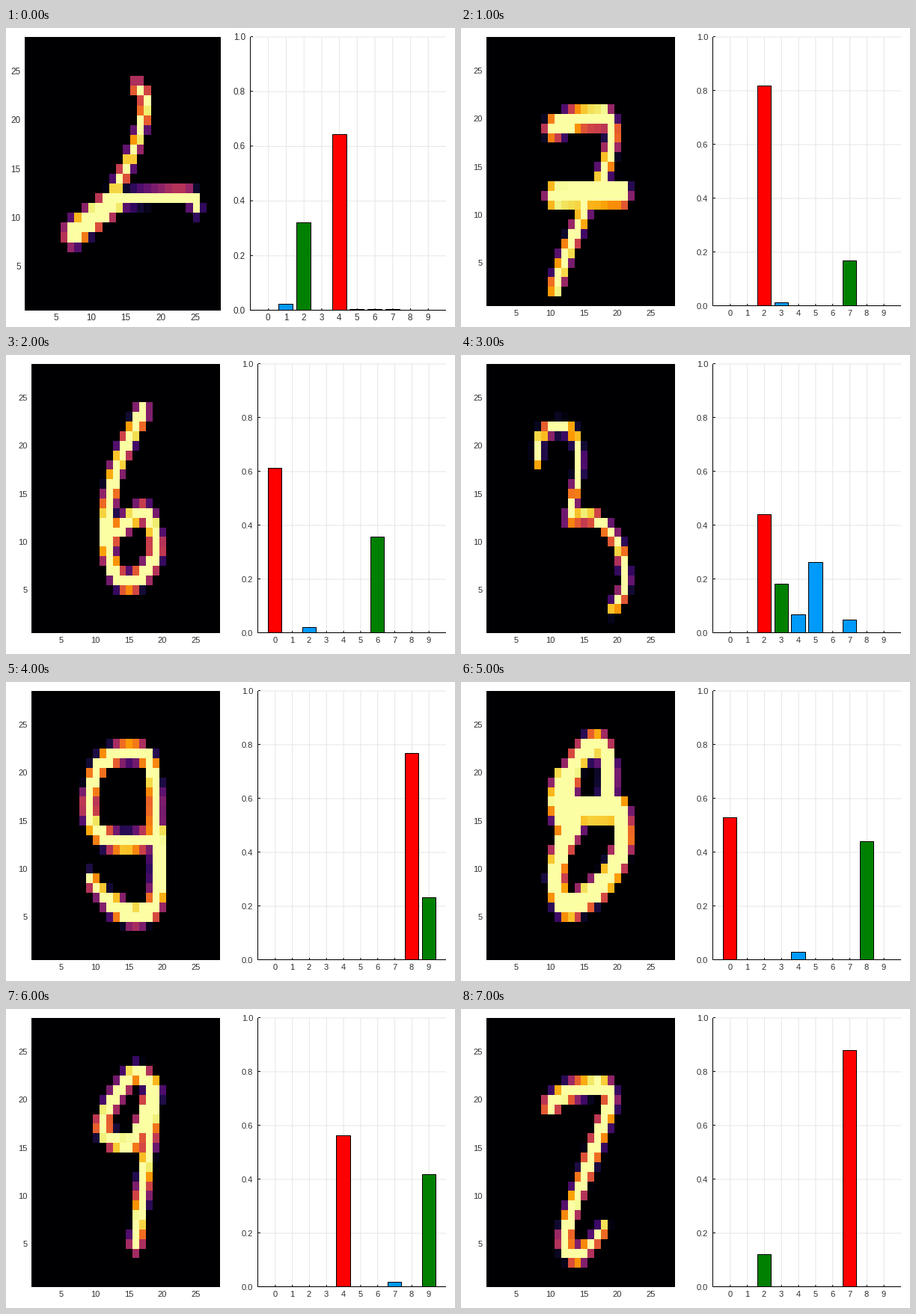
Write a matplotlib script that moves like this. It is 600 px wide and 400 px high and loops after 8000 ms.

```python
import numpy as np
import matplotlib.pyplot as plt
from matplotlib.animation import FuncAnimation
from matplotlib.patches import Rectangle

N = 28
BLUE, GREEN, RED = "#009afa", "#008000", "#ff0000"
TOP, RIGHT = 12, 588

# Each stroke: half width of the pen, then the points its curve runs through.
SLANTED_TWO = [
    (.75, (16.5, 23.4), (17.7, 22), (17, 19), (15.5, 16), (13.5, 13), (12.5, 11.5)),
    (1.35, (13.6, 11.9), (7.3, 8.4)),
    (.72, (13, 11.8), (18, 12.1), (24, 12.2), (25, 11)),
]
CROSSED_SEVEN = [
    (1.2, (10.2, 19), (14, 20), (18, 20.2)),
    (.9, (18.3, 20.3), (19.2, 19), (19, 17), (17.7, 14), (16, 12)),
    (1.4, (10.5, 12), (20.5, 12.2)),
    (.95, (15.5, 11.5), (14.2, 9), (12.3, 6), (10.6, 2.4)),
]
TALL_SIX = [
    (1.0, (17, 23.5), (13, 17.5), (11.5, 11), (13, 6.6), (16, 6), (19, 9),
     (17.2, 13), (12, 10.5)),
]
OPEN_THREE = [
    (.65, (8, 18.4), (8.4, 21), (11.5, 22), (13.7, 20.8), (14.1, 17.5),
     (13.2, 14), (12.7, 12.4)),
    (.7, (12.7, 12.5), (16.5, 12.5), (19.8, 10), (21, 7), (20.9, 5), (19.4, 3)),
]
HOOKED_NINE = [
    (1.0, (18.8, 14), (18.8, 18), (17.8, 21.4), (14.5, 22.2), (10.5, 20.7),
     (9, 17), (10, 14), (14, 12.7), (19, 13.3)),
    (1.15, (19.2, 14), (19.4, 9), (18.5, 6), (15.5, 5.2), (12.2, 6.4)),
    (.8, (12, 6.5), (9.2, 8.9)),
]
NARROW_EIGHT = [
    (1.25, (18.5, 16.5), (18.5, 21), (17, 23), (14.5, 21.8), (12.5, 19.5)),
    (1.9, (12.2, 19), (11.5, 17), (12.6, 14.6)),
    (1.4, (11.5, 16.4), (15, 16.1), (20, 16.1)),
    (1.35, (20.5, 16), (20.7, 12.5), (18.5, 9), (15, 6.9), (12.3, 6.1),
     (10.7, 8.5), (11.5, 12), (13.7, 14.8)),
]
LOOPED_NINE = [
    (.95, (18.5, 21.5), (15.5, 22.6), (10.8, 17.3), (15.5, 15.6), (18.8, 21.3),
     (17, 10.5), (16, 5)),
]
CURLED_TWO = [
    (1.0, (9.8, 19.4), (12.5, 20.8), (17.5, 21.4), (18.9, 20), (17.6, 17),
     (15.5, 13), (13.1, 8.5), (12, 5.2), (13.5, 3.8), (15, 4.2)),
    (.65, (15, 4.3), (16.5, 5.3), (18, 6.7)),
]

# Strokes, true digit, predicted digit, probabilities
SAMPLES = [
    (SLANTED_TWO, 2, 4, {1: .022, 2: .32, 4: .643, 5: .005, 6: .004, 7: .004}),
    (CROSSED_SEVEN, 7, 2, {2: .817, 3: .012, 7: .169}),
    (TALL_SIX, 6, 0, {0: .612, 2: .021, 6: .356}),
    (OPEN_THREE, 3, 2, {2: .439, 3: .181, 4: .068, 5: .262, 7: .048}),
    (HOOKED_NINE, 9, 8, {8: .768, 9: .231}),
    (NARROW_EIGHT, 8, 0, {0: .529, 4: .03, 8: .44}),
    (LOOPED_NINE, 9, 4, {4: .562, 7: .018, 9: .418}),
    (CURLED_TWO, 2, 7, {2: .121, 7: .879}),
]


def smooth(points, steps=24):
    """Catmull-Rom curve through the points."""
    p = np.array(points, float)
    p = np.vstack([2 * p[0] - p[1], p, 2 * p[-1] - p[-2]])
    t = np.linspace(0, 1, steps)[:, None]
    return np.vstack([
        b + .5 * t * (c - a + t * (2 * a - 5 * b + 4 * c - d
                                   + t * (3 * (b - c) + d - a)))
        for a, b, c, d in zip(p, p[1:], p[2:], p[3:])])


def rasterize(strokes):
    """Ink in each grid cell, from its distance to the pen path."""
    gx, gy = np.meshgrid(np.arange(1, N + 1), np.arange(1, N + 1))
    ink = np.zeros((N, N))
    for width, *points in strokes:
        curve = smooth(points)
        dist = np.hypot(gx[..., None] - curve[:, 0],
                        gy[..., None] - curve[:, 1]).min(axis=2)
        ink = np.maximum(ink, 1.2 * (width - dist) + .5)
    return np.clip(ink, 0, 1)


IMAGES = [rasterize(sample[0]) for sample in SAMPLES]

fig = plt.figure(figsize=(6, 4), dpi=100, facecolor="white")
ax = fig.add_axes([0, 0, 1, 1])


def line(xs, ys, color="black", z=4):
    ax.plot(xs, ys, color=color, lw=.72, zorder=z, snap=False,
            solid_capstyle="butt")


def axes_lines(left, right, base):
    line([left - .5] * 2, [TOP, base])
    line([left - 1, right], [base - .5] * 2)


def label(x, y, text, size, ha="center"):
    ax.text(x, y + .36 * size, text, ha=ha, va="baseline", color="#303030",
            fontsize=size * .72, family="Liberation Sans")


def edge(v):
    """Centre of the pixel that holds v, for crisp outlines."""
    return np.floor(v) + .5


def draw_digit(image, left, right, base, size):
    ax.imshow(image, cmap="inferno", vmin=0, vmax=1, origin="lower",
              extent=(left, right, base, TOP), interpolation="nearest",
              aspect="auto", zorder=1)
    axes_lines(left, right, base)
    for v in range(5, 26, 5):
        f = (v - .5) / N
        label(left + f * (right - left) - 1.2, base + 9, str(v), size)
        label(left - 6.5, base - f * (base - TOP), str(v), size, "right")


def draw_bars(truth, guess, probs, left, base, size):
    height, step = base - TOP, (RIGHT - left) / 11
    for i in range(6):
        y = base - height * i / 5
        line([left, RIGHT], [y, y], "#e6e6e6", 1)
        line([left, left + 3], [y - .5, y - .5])
        label(left - 7, y - .3, f"{i / 5:.1f}", size, "right")
    for d in range(10):
        x = left + step * (d + 1)
        line([x, x], [TOP, base], "#e6e6e6", 1)
        line([x, x], [base - 3, base], z=2)
        label(x - .5, base + 9, str(d), size)
        color = GREEN if d == truth else RED if d == guess else BLUE
        x0, x1 = edge(x - .4 * step), edge(x + .4 * step)
        y0, y1 = edge(base - height * probs.get(d, 0)), base - .5
        ax.add_patch(Rectangle((x0, y1), x1 - x0, min(y0 - y1, 0), fc=color,
                               ec="black", lw=.72, zorder=3, snap=False))
    axes_lines(left, RIGHT, base)


def draw(i):
    ax.clear()
    _, truth, guess, probs = SAMPLES[i]
    # The first plot has slightly narrower margins and larger labels.
    margin, size = (0, 11.6) if i == 0 else (1, 11.1)
    base = 378 - 6 * margin
    draw_digit(IMAGES[i], 26 + 9 * margin, 287 - margin, base, size)
    draw_bars(truth, guess, probs, 327 + 10 * margin, base, size)
    ax.set_xlim(0, 600)
    ax.set_ylim(400, 0)
    ax.axis("off")
    return []


anim = FuncAnimation(fig, draw, frames=len(SAMPLES), interval=1000,
                     init_func=lambda: [], repeat=True, repeat_delay=0)
plt.show()
```
